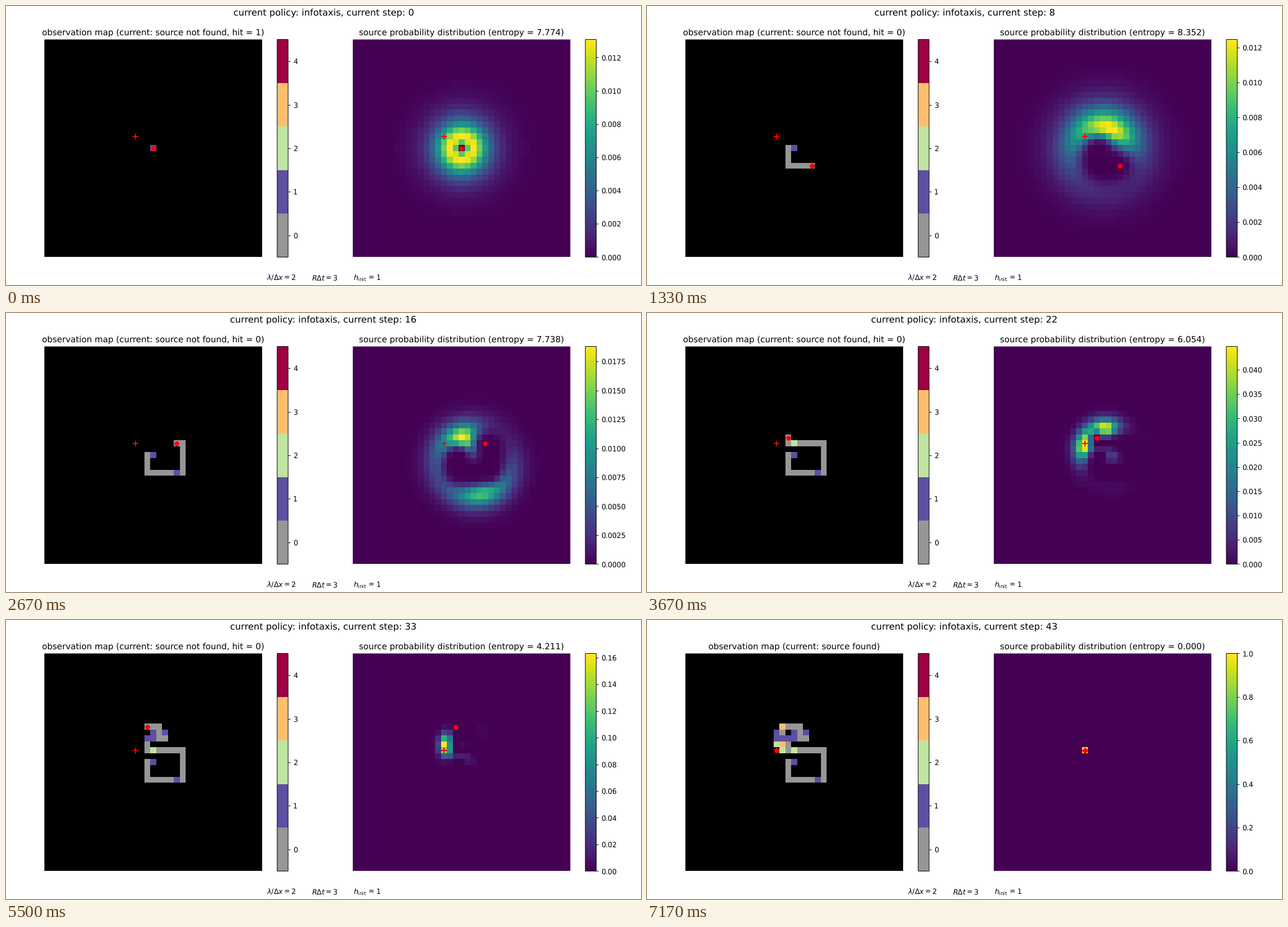
Write a matplotlib script that moves like this. It is 1128x496 px and loops after 7.34 s.

```python
import numpy as np
import matplotlib.pyplot as plt
from matplotlib.animation import FuncAnimation
from matplotlib.colors import ListedColormap
from matplotlib.patches import Rectangle
from matplotlib.transforms import IdentityTransform

W, H, DPI = 1128, 496, 72          # at 72 dpi one point is one pixel
LOOP_MS = 7340
SUB = 3                            # drawn frames per search step
TOP, SIDE = 59.5, 386.9            # panel top and side length
N = 37                             # cells per side
START, GOAL = (18, 18), (15, 16)   # (column, row)
LAMBDA, RATE = 2.0, 3.0

MOVES = "LDDDRRRRRRUUUUULLLLLLUURURRDLUULLLDLDDRUDDL"
STEP = {"L": (-1, 0), "R": (1, 0), "U": (0, -1), "D": (0, 1)}
HITS = {0: 1, 9: 1, 20: 2, 23: 1, 24: 1, 25: 1, 27: 1, 34: 3,
        36: 1, 37: 1, 38: 2, 40: 1, 41: 3, 42: 2}

plt.rcParams.update({
    "font.family": "DejaVu Sans", "font.size": 12.53, "text.hinting": "none",
    "axes.titlesize": 15.04, "axes.titlepad": 7.5, "axes.linewidth": 1.0,
    "ytick.major.size": 4.4, "ytick.major.pad": 4.4, "ytick.major.width": 1.0,
})


def bessel_k0(x):
    t = np.linspace(0, 8, 801)
    f = np.exp(-np.asarray(x)[..., None] * np.cosh(t))
    return (f.sum(-1) - f[..., 0] / 2) * (t[1] - t[0])


def mean_hits(pos):
    rows, cols = np.mgrid[:N, :N]
    d = np.hypot(cols - pos[0], rows - pos[1])
    return RATE / np.log(2 * LAMBDA) * bessel_k0(np.maximum(d, 1) / LAMBDA)


def bayes(p, pos, hit):
    mu = mean_hits(pos)
    p = p * mu ** hit * np.exp(-mu)
    p[pos[1], pos[0]] = 0
    return p / p.sum()


def entropy(p):
    q = p[p > 0]
    return abs(np.sum(q * np.log2(q)))


def simulate():
    """Return (position, hit, hit map, source distribution) for every step."""
    pos, p = START, np.ones((N, N))
    seen = np.full((N, N), np.nan)
    states = []
    for k in range(len(MOVES) + 1):
        if k:
            dx, dy = STEP[MOVES[k - 1]]
            pos = pos[0] + dx, pos[1] + dy
        hit = HITS.get(k, 0)
        if pos == GOAL:
            p = np.zeros((N, N))
            p[pos[1], pos[0]] = 1
        else:
            p = bayes(p, pos, hit)
            seen[pos[1], pos[0]] = hit
        states.append((pos, hit, seen.copy(), p))
    return states


states = simulate()
fig = plt.figure(figsize=(W / DPI, H / DPI), dpi=DPI, facecolor="white")


def box(x, w):
    return fig.add_axes([x / W, 1 - (TOP + SIDE) / H, w / W, SIDE / H])


def trim(x):
    """White frame that softens the panel's edge to its fractional pixel."""
    fig.add_artist(Rectangle(
        (x - 1, H - TOP - SIDE - 1), SIDE + 2, SIDE + 2, fill=False,
        edgecolor="white", linewidth=2, snap=False,
        transform=IdentityTransform()))


def panel(x, cmap, lo, hi):
    ax = box(x, SIDE)
    im = ax.imshow(np.zeros((N, N)), cmap=cmap, vmin=lo, vmax=hi,
                   interpolation="nearest")
    ax.axis("off")
    trim(x)
    bar = fig.colorbar(im, cax=box(x + 413.5, 19.4))
    bar.outline.set_snap(False)
    ax.plot(*GOAL, "r+", markersize=9.5, markeredgewidth=2)
    dot, = ax.plot(*START, "ro", markersize=7.5, markeredgewidth=1.25)
    return ax, im, bar, dot


hit_cmap = ListedColormap(
    ["#969696", *plt.get_cmap("Spectral_r")(np.linspace(0, 1, 4))])
hit_cmap.set_bad("black")

ax_map, im_map, bar_map, dot_map = panel(68.2, hit_cmap, -0.5, 4.5)
ax_prob, im_prob, bar_prob, dot_prob = panel(615.6, "viridis", 0, 1)
bar_map.set_ticks(range(5))

head = fig.text(0.5, 1 - 17 / H, "", size=16.3, ha="center")
for x, label in [(463, r"$\lambda / \Delta x = $2"),
                 (543, r"$R \Delta t = $3"),
                 (617, r"$h_{\mathrm{init}}$ = 1")]:
    fig.text(x / W, 1 - 488 / H, label)


def draw(i):
    # the step reached by the end of this frame's time slot
    k = min((i + 1) // SUB, len(states) - 1)
    pos, hit, seen, p = states[k]
    found = pos == GOAL
    status = "source found" if found else f"source not found, hit = {hit}"
    head.set_text(f"current policy: infotaxis, current step: {k}")
    ax_map.set_title(f"observation map (current: {status})")
    ax_prob.set_title(
        f"source probability distribution (entropy = {entropy(p):.3f})")
    im_map.set_data(np.ma.masked_invalid(seen))
    im_prob.set_data(p)
    im_prob.set_clim(0, p.max())
    for dot in (dot_map, dot_prob):
        dot.set_data([pos[0]], [pos[1]])
    return ()


frames = SUB * len(states)
anim = FuncAnimation(fig, draw, frames=frames, interval=LOOP_MS / frames,
                     repeat=True, repeat_delay=0, init_func=lambda: draw(0))
plt.show()
```
